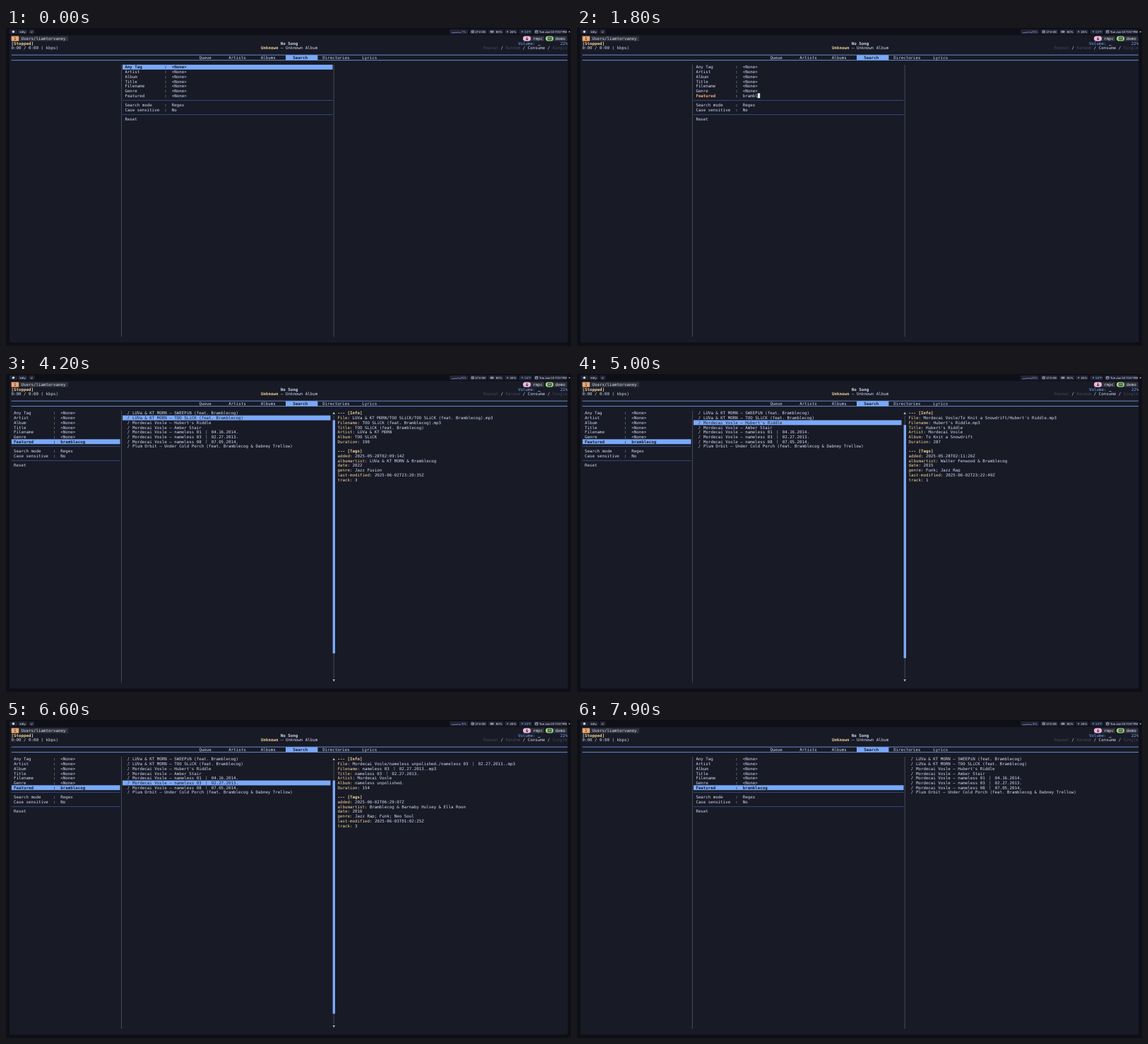
An HTML page for the animation above (8000 ms loop, 800x450 px).

```html
<!DOCTYPE html>
<html lang="en">
<head>
<meta charset="utf-8">
<title>Terminal music search</title>
<style>
html, body { margin: 0; width: 100%; height: 100%; overflow: hidden; background: #0e0f17; }
svg { display: block; width: 800px; height: 450px; }
text { white-space: pre; text-rendering: geometricPrecision; }
.mono { font: 5.8px "DejaVu Sans Mono", "Liberation Mono", monospace; }
.bar { font: 500 4px Inter, Roboto, sans-serif; }
.b { font-weight: bold; }
</style>
</head>
<body>
<svg viewBox="0 0 800 450">
  <g id="desktop"></g>
  <g id="cpu"></g>
  <g id="screen"></g>
</svg>
<script>
const LOOP = 8000;
const CELL = 3.492, ROW = 6.735, TOP = 51.9;
const C = {
  bg: '#181a26', text: '#d3daf2', dim: '#434759', line: '#666b80', blue: '#7aa9f8',
  rule: '#40609f', peach: '#f0a872', yellow: '#f2d59a', pill: '#222433', tag: '#30333b'
};

const rect = (x, y, w, h, fill, rx = 0) =>
  `<rect x="${x}" y="${y}" width="${w}" height="${h}" fill="${fill}" rx="${rx}"/>`;
const stroke = (d, color, width = 0.6) =>
  `<path d="${d}" fill="none" stroke="${color}" stroke-width="${width}"/>`;
const escape = s => s.replace(/&/g, '&amp;').replace(/</g, '&lt;');
const label = (x, y, s, fill, cls) =>
  `<text x="${x}" y="${y}" fill="${fill}" class="${cls}">${escape(s)}</text>`;
const rowTop = r => TOP + r * ROW;

// Text on the terminal grid; the full-width bar takes two cells.
function put(x, row, s, fill = C.text, bold = false) {
  const y = rowTop(row) + 5.4;
  let out = '';
  s.split('｜').forEach((part, i) => {
    if (i) {
      out += stroke(`M${x + CELL} ${y - 4.7}v5.4`, fill, 0.4);
      x += 2 * CELL;
    }
    if (part) out += label(x, y, part, fill, bold ? 'mono b' : 'mono');
    x += part.length * CELL;
  });
  return out;
}

const QUERY = 'bramblecog';
const FIELDS = ['Any Tag', 'Artist', 'Album', 'Title', 'Filename', 'Genre', 'Featured'];

const duo = 'LUVa & KT MORN', solo = 'Mordecai Vosle', band = 'Plum Orbit', guest = 'Bramblecog';
const sketches = 'nameless unpolished.', novel = 'To Knit a Snowdrift';
const song = (artist, title, album, duration, added, albumartist, date, genre, modified, track) =>
  ({ artist, title, album, duration, added, albumartist, date, genre, modified, track });
const SONGS = [
  song(duo, `SWEEPiN (feat. ${guest})`, 'TOO SLiCK', 174, '2025-05-28T02:09:14Z',
    `${duo} & ${guest}`, 2022, 'Jazz Fusion', '2025-06-02T23:20:31Z', 6),
  song(duo, `TOO SLiCK (feat. ${guest})`, 'TOO SLiCK', 190, '2025-05-28T02:09:14Z',
    `${duo} & ${guest}`, 2022, 'Jazz Fusion', '2025-06-02T23:20:35Z', 3),
  song(solo, "Hubert's Riddle", novel, 287, '2025-05-28T02:11:26Z',
    `Walter Fenwood & ${guest}`, 2015, 'Funk; Jazz Rap', '2025-06-02T23:22:49Z', 1),
  song(solo, 'Amber Stair', novel, 301, '2025-05-28T02:11:26Z',
    `Ella Roon & ${guest}`, 2015, 'Funk; Jazz Rap', '2025-06-02T23:22:58Z', 5),
  song(solo, 'nameless 01 ｜ 04.16.2014.', sketches, 248, '2025-06-02T06:29:07Z',
    `${guest} & Ella Roon`, 2016, 'Jazz Rap; Funk', '2025-06-03T01:02:14Z', 1),
  song(solo, 'nameless 03 ｜ 02.27.2013.', sketches, 154, '2025-06-02T06:29:07Z',
    `${guest} & Barnaby Hulsey & Ella Roon`, 2016, 'Jazz Rap; Funk; Neo Soul', '2025-06-03T01:02:25Z', 3),
  song(solo, 'nameless 08 ｜ 07.05.2014.', sketches),
  song(band, `Under Cold Porch (feat. ${guest} & Dabney Trellow)`, band)
];

function desktop() {
  const bar = (x, s, fill = C.text) => label(x, 6.6, s, fill, 'bar');
  const pill = (x, w) => rect(x, 2, w, 6.6, C.pill, 1.6);
  const icon = d => stroke(d, C.text, 0.6);
  let out = rect(0, 0, 800, 450, '#0e0f17') + rect(5, 10, 790.5, 435, C.bg, 2.5);

  out += [[5, 11], [17, 13], [32, 8.5], [628, 26], [656.5, 24.5], [683, 21.5], [706, 18], [726.5, 18.5], [747, 47.5]]
    .map(p => pill(...p)).join('');
  out += `<circle cx="10.4" cy="5.2" r="1.7" fill="${C.text}"/><circle cx="797.7" cy="5.3" r=".9" fill="#c9cede"/>`;
  out += bar(19.5, 'kitty') + bar(34.8, 'U');
  out += icon('M659.3 3.8h3v3h-3zM659.3 5.3h3') + bar(664.3, '27.0 GB');
  out += icon('M686 4.3h4v2h-4zM686 5.3h4') + bar(693.7, '80%');
  out += icon('M709 5.3h2.2M710.1 4.2v2.2') + bar(713.5, '26%');
  out += stroke('M729.8 5.2h2.4M731 4v2.4', C.blue, 0.7) + bar(734.3, '53°F', C.blue);
  out += icon('M749.5 3.8h3.4v3.2h-3.4zM749.5 4.8h3.4') + bar(755, 'Tue Jun 03 11:57 PM');

  // Multiplexer line
  out += rect(7.6, 11.5, 10.6, 7, C.peach) + put(11.1, -6, '1', C.bg);
  out += rect(18.2, 11.5, 69.8, 7, C.tag) + put(21.6, -6, 'Users/liamtorvaney');
  out += rect(738, 11.5, 24, 7, C.tag) + rect(732, 11.5, 11, 7, '#f0b8dc', 3.4);
  out += stroke('M737.7 13v4M736.2 15.5l1.5 1.5l1.5-1.5', C.bg, 1) + put(746, -6, 'rmpc');
  out += rect(770, 11.5, 24.5, 7, C.tag) + rect(764, 11.5, 11, 7, '#9ed586', 3.4);
  out += stroke('M767.6 13.2h4.6v3.6h-4.6zM769 15.2h2', C.bg, 0.9) + put(777.7, -6, 'demo');

  // Player header
  out += put(7.6, -4.5 - 0.5, '[Stopped]', C.yellow, true) + put(388.8, -5, 'No Song', C.text, true);
  out += put(725, -5, 'Volume: ', C.blue) + rect(753.2, 24, 3.4, 0.8, C.blue) + put(784.8, -5, '22%', C.blue);
  out += put(7.6, -4, '0:00 / 0:00 ( kbps)');
  out += put(361, -4, 'Unknown', C.yellow, true) + put(361 + 7 * CELL, -4, ' – Unknown Album');
  let x = 676;
  ['Repeat', 'Random', 'Consume', 'Single'].forEach((mode, i) => {
    if (i) { out += put(x, -4, ' / '); x += 3 * CELL; }
    out += put(x, -4, mode, mode === 'Consume' ? C.text : C.dim);
    x += mode.length * CELL;
  });

  // Tabs
  out += stroke('M7.6 38.2H795M7.6 45.6H795', C.blue, 0.8) + rect(396, 38.3, 45.4, 7.2, C.blue);
  [['Queue', 273.4], ['Artists', 315.3], ['Albums', 360.8], ['Search', 406.2], ['Directories', 448.2], ['Lyrics', 504.2]]
    .forEach(([name, tx]) => { out += put(tx, -2, name, name === 'Search' ? C.bg : C.text, name === 'Search'); });
  return out + stroke('M163.5 52V437', C.line);
}

function cpu(load) {
  const h = load / 10;
  return stroke(`M631 6.7h3l2-${0.6 * h}l2 ${0.3 * h}l2-${0.9 * h}l2 ${0.9 * h}h2`, '#9d8ff0', 0.7) +
    label(load > 9 ? 643.8 : 645.3, 6.6, load + '%', '#9d8ff0', 'bar');
}

function form(x, left, right, state) {
  let out = '';
  FIELDS.forEach((name, i) => {
    const here = i === state.field, editing = here && state.editing, selected = here && !editing;
    const typed = i === 6 ? QUERY.slice(0, state.typed) : '';
    const value = typed || (editing ? '' : '<None>');
    if (selected) out += rect(left, rowTop(i), right - left, 6.9, C.blue);
    const nameColor = selected ? C.bg : editing ? C.peach : C.text;
    out += put(x, i, name, nameColor, here) + put(x + 16 * CELL, i, ':', nameColor, here);
    out += put(x + 19 * CELL, i, value, selected ? C.bg : C.text, selected);
    if (editing) out += rect(x + (19 + typed.length) * CELL, rowTop(i), CELL, 6.9, '#e3e7f5');
  });
  [['Search mode', 'Regex'], ['Case sensitive', 'No']].forEach(([name, value], i) => {
    out += put(x, 8 + i, name) + put(x + 16 * CELL, 8 + i, ':') + put(x + 19 * CELL, 8 + i, value);
  });
  out += stroke(`M${left} ${rowTop(7.5)}H${right}M${left} ${rowTop(10.5)}H${right}`, C.rule, 0.7);
  return out + put(x, 11, 'Reset');
}

function results(x, selected) {
  return SONGS.map((s, i) => {
    const on = i === selected, color = on ? C.bg : C.text;
    return (on ? rect(165, rowTop(i), 294.5, 6.9, C.blue) : '') +
      put(x, i, '♪', color) + put(x + 2.1 * CELL, i, `${s.artist} – ${s.title}`, color);
  }).join('');
}

function details(s) {
  const x = 469.5, file = s.title + '.mp3';
  const info = [['File', `${s.artist}/${s.album}/${file}`], ['Filename', file], ['Title', s.title],
    ['Artist', s.artist], ['Album', s.album], ['Duration', s.duration]];
  const tags = [['added', s.added], ['albumartist', s.albumartist], ['date', s.date], ['genre', s.genre],
    ['last-modified', s.modified], ['track', s.track]];
  const block = (row, title, pairs) => put(x, row, `--- [${title}]`, C.yellow, true) +
    pairs.map(([key, value], i) => put(x, row + 1 + i, key + ':', C.yellow) +
      put(x + (key.length + 2) * CELL, row + 1 + i, String(value))).join('');
  return block(0, 'Info', info) + block(8, 'Tags', tags);
}

function scrollbar(selected) {
  const start = Math.round(selected * 55 / 62);
  return stroke('M464.2 58.6V430.5', C.line) + rect(462.6, rowTop(1 + start), 3.4, 49 * ROW, C.blue) +
    `<path d="M462.4 57l1.8-3.6l1.8 3.6zM462.4 432l1.8 3.6l1.8-3.6z" fill="#a9afc4"/>`;
}

const clamp = (v, lo, hi) => Math.max(lo, Math.min(hi, v));
const PICKS = [4150, 4650, 5750, 6400, 6500];

function stateAt(t) {
  return {
    field: clamp(Math.floor(t / 110), 0, 6),
    editing: t >= 1100 && t < 2450,
    typed: clamp(Math.floor((t - 1150) / 100), 0, QUERY.length),
    found: t >= 2500,
    pick: t >= 3550 && t < 7050 ? PICKS.filter(at => t >= at).length : -1
  };
}

function screen(state) {
  if (state.pick >= 0) {
    return form(11, 7.8, 161.5, state) + results(171.6, state.pick) +
      scrollbar(state.pick) + details(SONGS[state.pick]);
  }
  return form(168.4, 165, 462.5, state) + stroke('M464.2 52V437', C.line) +
    (state.found ? results(472.6, -1) : '');
}

const layer = id => document.getElementById(id);
const shown = {};
function update(id, markup) {
  if (shown[id] !== markup) layer(id).innerHTML = shown[id] = markup;
}

function draw(t) {
  update('cpu', cpu(t < 400 ? 7 : t < 5900 ? 10 : 8));
  update('screen', screen(stateAt(t)));
}

update('desktop', desktop());
draw(0);
const begin = performance.now();
(function tick() {
  draw((performance.now() - begin) % LOOP);
  requestAnimationFrame(tick);
})();
</script>
</body>
</html>
```
